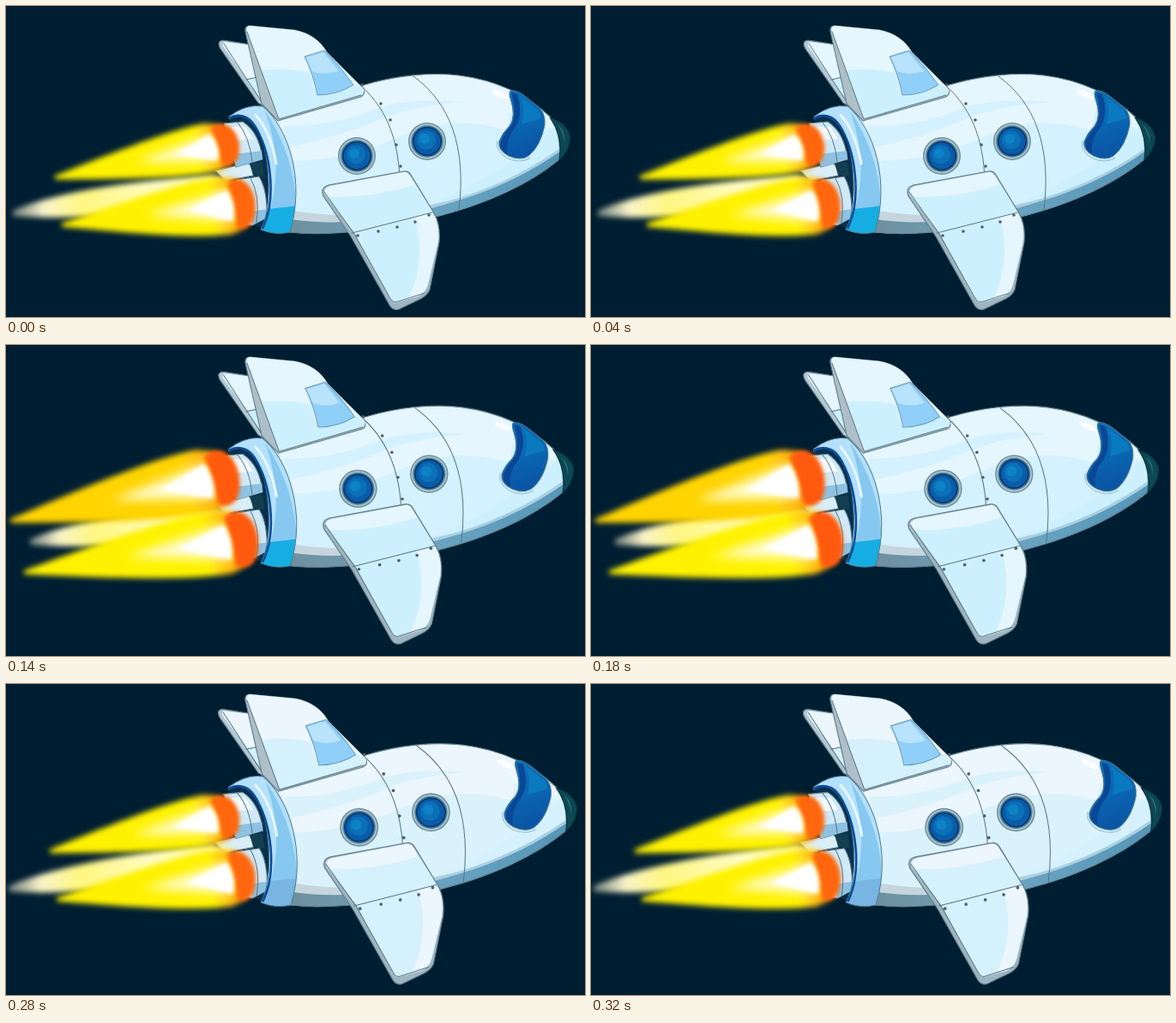
These frames come from a looping animation (675x363 px, 0.35 s). An HTML page:

```html
<!DOCTYPE html>
<html lang="en">
<head>
<meta charset="utf-8">
<title>Rocket</title>
<style>
html, body { margin: 0; width: 100%; height: 100%; overflow: hidden; background: #001e31; }
svg { display: block; width: 675px; height: 363px; }
.ln { fill: none; stroke: #567786; stroke-width: 1; stroke-linecap: round; }
.ol { stroke: #5f7e8b; stroke-width: 1.1; stroke-linejoin: round; }
.skin { fill: var(--skin); }
.tint { fill: var(--tint); }
</style>
</head>
<body>
<svg id="stage" viewBox="0 0 675 363">
  <defs>
    <filter id="soft" x="-20%" y="-40%" width="140%" height="180%"><feGaussianBlur stdDeviation="3"/></filter>
    <filter id="edge" x="-40%" y="-40%" width="180%" height="180%"><feGaussianBlur stdDeviation="2"/></filter>
    <filter id="glow" x="-30%" y="-60%" width="160%" height="220%"><feGaussianBlur stdDeviation="6"/></filter>
    <linearGradient id="pale">
      <stop offset="0" stop-color="#c9cbb8" stop-opacity=".6"/>
      <stop offset=".14" stop-color="#f8f3c8"/>
      <stop offset=".32" stop-color="#fff780"/>
      <stop offset=".65" stop-color="#fffbc4"/>
      <stop offset="1" stop-color="#fff98c"/>
    </linearGradient>
    <linearGradient id="bellyFill" x1="0" x2="1">
      <stop offset="0" stop-color="#6f909d"/>
      <stop offset=".5" stop-color="#6ba4c2"/>
      <stop offset="1" stop-color="#5596b8"/>
    </linearGradient>
    <linearGradient id="pane" x1="0" y1="0" x2=".2" y2="1">
      <stop offset="0" stop-color="#0a70b8"/>
      <stop offset=".5" stop-color="#0a68b4"/>
      <stop offset="1" stop-color="#0a55a4"/>
    </linearGradient>
    <clipPath id="hullClip"><path d="M298 117C340 120 385 102 418 92C455 81 495 77 528 81C575 87 610 106 635 130Q648 150 645 179C610 208 560 231 505 245C455 259 380 270 330 264C344 215 330 150 298 117Z"/></clipPath>
    <clipPath id="ringClip"><path id="ringPath" d="M260 129Q280 114 299 117C330 142 349 205 331 264Q314 268 297 261C316 225 304 128 275 128Q266 128 260 132Z"/></clipPath>
    <clipPath id="wingClip"><path d="M378 210L463 194Q468 193 471 198L497 240Q506 254 504 275L492 325Q489 336 480 339L456 346Q451 347 448 342L406 264L372 220Q369 213 378 210Z"/></clipPath>
    <clipPath id="finClip"><path d="M284 23L336 28Q362 33 374 54L416 96Q419 101 414 104L318 132L281 31Q279 24 284 23Z"/></clipPath>
  </defs>
  <rect width="675" height="363" fill="#001e31"/>

  <g id="ship">
    <!-- far fin -->
    <path class="ol" fill="#b4c9d3" d="M253 40L285 45L302 118L294 113L250 50Q245 41 253 40Z"/>
    <path class="skin" d="M256 42L284 45.500L293 84L281 85L253 47Q252 42 256 42Z"/>
    <path class="tint" d="M281 86L293 84L300 112Z"/>
    <path class="ln" d="M280 86L293 83M254 44L298 112"/>

    <!-- engine bay -->
    <path fill="#08304c" d="M260 131Q276 124 288 140C309 170 314 225 298 260L284 252L276 190Z"/>
    <path class="ol" fill="#d9eef7" d="M244 192L282 183Q289 188 288 198L256 204Z"/>
    <path fill="#123f50" d="M284 184L299 182L301 199L288 197Z"/>
    <path class="ol" fill="#cfe9f6" d="M254 137L276 135C290 144 297 160 299 179L268 188Z"/>
    <path fill="#8ec2e2" d="M266 173L298 169L299 179L268 188Z"/>
    <path fill="#f1faff" d="M262 141L279 141L288 155L266 157Z"/>
    <path class="ln" d="M270 136Q284 152 287 182"/>
    <path class="ol" fill="#cfe9f6" d="M268 203L295 199Q305 215 304 247L287 256L276 255Z"/>
    <path fill="#8ec2e2" d="M285 240L304 237L304 247L287 256Z"/>
    <path class="ln" d="M285 201Q297 222 292 253"/>

    <!-- hull -->
    <g clip-path="url(#hullClip)">
      <rect class="skin" x="290" y="70" width="370" height="205"/>
      <path class="tint" d="M323 140Q380 142 440 117Q540 94 650 150V215L330 250Q338 190 323 140Z" opacity=".72"/>
      <path class="skin" d="M325 166Q390 153 450 127Q510 108 589 112L584 145Q520 126 462 151Q400 180 334 181Z"/>
      <path class="tint" d="M462 240Q560 215 640 140L650 190L510 255Z"/>
      <path fill="#c6d5dd" d="M334 239Q390 248 450 242L512 228L500 255L330 272Z"/>
      <path fill="#a9cfe0" d="M490 234Q580 214 650 163V200L490 255Z"/>
      <path fill="url(#bellyFill)" d="M332 249C400 259 470 246 540 223Q600 203 650 167V200L510 260L330 275Z"/>
    </g>
    <path class="ol" fill="none" d="M298 117C340 120 385 102 418 92C455 81 495 77 528 81C575 87 610 106 635 130Q648 150 645 179C610 208 560 231 505 245C455 259 380 270 330 264"/>
    <ellipse cx="576" cy="103" rx="11" ry="3.500" transform="rotate(24 576 103)" fill="#fff" opacity=".8"/>
    <path class="ln" d="M410 90C442 116 458 154 459 205M475 82C518 113 537 165 528 238"/>
    <g class="rivets" data-at="415,92 437,114 448,133 455,162 460,187"></g>

    <!-- nose -->
    <path fill="#0b4853" stroke="#06313d" d="M634 130Q655 137 658 153Q657 169 645 180Q650 153 634 130Z"/>
    <path fill="#2f6a75" d="M643 138Q653 146 651 161Q650 148 643 138Z"/>

    <!-- cockpit -->
    <path fill="url(#pane)" stroke="#48768f" d="M588 99Q595 97 606 106L622 119Q629 126 628 139Q623 164 609 175Q600 181 586 175Q573 168 575 158Q578 149 587 140Q595 129 588 108Q586 101 588 99Z"/>
    <path fill="#0a4795" d="M589 101L596 103Q604 126 593 143Q583 154 584 173Q575 167 577 159Q580 150 588 141Q597 128 589 101Z"/>
    <path fill="#0a86c8" d="M600 106L620 121Q624 126 624 131L601 138Q606 121 600 106Z" opacity=".6"/>
    <path fill="none" stroke="#a8cddd" stroke-width="1.5" d="M573 157Q570 169 585 178Q600 184 611 177"/>

    <!-- ring -->
    <g clip-path="url(#ringClip)">
      <rect x="255" y="110" width="90" height="160" fill="#b3e0fb"/>
      <path fill="#86c8f0" d="M302 122Q340 180 338 245L304 248Q326 190 302 122Z"/>
      <path id="ringLow" d="M306 237L340 233V270H290Z"/>
      <path fill="none" stroke="#e8f7ff" stroke-width="3" stroke-linecap="round" d="M291 127Q309 148 315 184"/>
    </g>
    <use href="#ringPath" fill="none" stroke="#4d7a94"/>
    <path fill="none" stroke="#0a4b98" stroke-width="2.500" d="M260 131Q276 122 289 139C309 168 316 225 299 260"/>

    <g id="ports"></g>

    <!-- near fin -->
    <path class="ol" fill="#aebfc8" d="M284 23Q278 23 279 30L298 114L317 134L414 106Q420 103 416 96L374 54Q362 33 336 28Z"/>
    <g clip-path="url(#finClip)">
      <rect class="skin" x="275" y="18" width="150" height="120"/>
      <path class="tint" d="M290 76Q328 71 354 78L362 104L408 91L425 105L318 138Z"/>
    </g>
    <path class="ln" d="M281 30L318 132L414 104"/>
    <path fill="#8fcff8" stroke="#6e9dbb" d="M348 59L371 52Q390 70 405 92Q386 104 363 104Q358 79 348 59Z"/>
    <path fill="#b9e3fd" d="M350 60L370 54L388 76Q370 82 357 76Z"/>

    <!-- wing -->
    <path class="ol" fill="#9fb5c0" d="M376 209L463 193Q469 192 472 197L498 240Q507 254 505 276L494 331Q491 338 483 342L458 354Q451 356 447 349L402 269L370 222Q366 212 376 209Z"/>
    <g clip-path="url(#wingClip)">
      <rect class="skin" x="365" y="190" width="145" height="165"/>
      <path class="tint" d="M371 222Q420 226 478 208L498 240L404 264Z"/>
      <path class="tint" d="M404 264L476 246Q492 298 466 348L452 350Z"/>
    </g>
    <path class="ln" d="M371 217L406 266L449 343Q452 347 457 345L488 335M403 265L497 241"/>
    <g class="rivets" data-at="410,268 434,263 456,258 477,252 493,244"></g>
  </g>
  <g id="fire"></g>
</svg>
<script>
const NS = "http://www.w3.org/2000/svg";
const STEP = 70;
const $ = id => document.getElementById(id);

function add(parent, tag, attrs) {
  const el = document.createElementNS(NS, tag);
  for (const k in attrs) el.setAttribute(k, attrs[k]);
  parent.appendChild(el);
  return el;
}

document.querySelectorAll(".rivets").forEach(g => {
  for (const p of g.dataset.at.split(" ")) {
    const [cx, cy] = p.split(",");
    add(g, "circle", { cx, cy, r: 1.8, fill: "#4d6069" });
  }
});

function port(cx, cy) {
  const disc = (r, fill, dx = 0, dy = 0) => add($("ports"), "circle", { cx: cx + dx, cy: cy + dy, r, fill });
  disc(22, "#6f929f");
  disc(20.5, "#a9c6d1");
  disc(18.8, "#5b7f90");
  disc(17.3, "#073f7a");
  disc(15.3, "#0a5ca8");
  disc(11, "#0b70b8", -1, -1.5);
  disc(6, "#0d82c6", -3, -3);
}
port(409, 175);
port(491, 158);

// Ship height and scale, flame ends [tailX, tailY, headX, headY, halfWidth], tail colours.
const YELLOW = "#fff205", AMBER = "#ffd406";
const poses = [
  { y: 23, s: 1, up: [54, 201, 270, 159, 29], low: [62, 256, 289, 229, 34], mid: [8, 242], hue: [YELLOW, YELLOW] },
  { y: 17, s: .999, up: [56, 194, 271, 152, 30], low: [64, 251, 290, 221, 34], mid: [-4, 242], hue: [YELLOW, YELLOW] },
  { y: 14, s: 1.011, up: [2, 206, 270, 151, 38], low: [18, 266, 292, 224, 38], mid: [28, 230], hue: [AMBER, YELLOW], hot: true },
  { y: 18, s: 1.018, up: [0, 200, 268, 153, 36], low: [16, 268, 288, 230, 39], mid: [27, 234], hue: [YELLOW, AMBER], hot: true },
  { y: 12, s: 1.021, up: [48, 196, 270, 152, 30], low: [56, 252, 289, 222, 34], mid: [3, 239], hue: [YELLOW, YELLOW], cool: true }
];

const plume = (L, w, from) =>
  `M${from} -2C${L * .4} ${-w * .64} ${L * .68} ${-w} ${L * .84} ${-w}` +
  `Q${L} ${-w * .8} ${L} 0Q${L} ${w * .8} ${L * .87} ${w}` +
  `C${L * .68} ${w} ${L * .4} ${w * .62} ${from} 2Z`;

function makeFlame(id) {
  const g = add($("fire"), "g", {});
  const ramp = add(g, "linearGradient", { id });
  const stop = (offset, color) => add(ramp, "stop", { offset, "stop-color": color });
  const tail = [stop(.1), stop(.78)];
  stop(.91, "#ffa310");
  stop(1, "#ff5a06");
  return {
    g, tail,
    body: add(g, "path", { filter: "url(#soft)", fill: `url(#${id})` }),
    core: add(g, "path", { filter: "url(#glow)", fill: "#fffbc4" }),
    cap: add(g, "path", { filter: "url(#edge)" }),
    heart: add(g, "path", { filter: "url(#edge)", fill: "#fff" })
  };
}

function setFlame(f, [tx, ty, hx, hy, w], hot, hue) {
  const L = Math.hypot(hx - tx, hy - ty);
  const turn = Math.atan2(hy - ty, hx - tx) * 180 / Math.PI;
  const rim = L - (hot ? 31 : 25);
  f.g.setAttribute("transform", `translate(${tx} ${ty}) rotate(${turn})`);
  f.tail.forEach(s => s.setAttribute("stop-color", hue));
  f.body.setAttribute("d", plume(L, w, 3));
  f.core.setAttribute("d", `M${L * .45} 0L${rim - 5} ${-w * .55}V${w * .58}Z`);
  f.heart.setAttribute("d", `M${L * .66} 0L${rim - 5} ${-w * .52}Q${rim + 5} 0 ${rim - 2} ${w * .58}Z`);
  f.cap.setAttribute("d",
    `M${rim - 3} ${-w * .74}Q${L - 13} ${-w * 1.05} ${L - 3} ${-w * .5}` +
    `Q${L + 3} 0 ${L - 3} ${w * .55}Q${L - 10} ${w} ${rim + 2} ${w * .78}` +
    `Q${rim + 4} 0 ${rim - 3} ${-w * .74}Z`);
  f.cap.setAttribute("fill", hot ? "#ff5a08" : "#ff6609");
}

const mid = add($("fire"), "path", { filter: "url(#soft)", fill: "url(#pale)" });
const up = makeFlame("upRamp");
const low = makeFlame("lowRamp");

function draw(t) {
  const p = poses[Math.floor(t / STEP) % poses.length];
  const ship = $("ship");
  ship.setAttribute("transform", `translate(281 ${p.y}) scale(${p.s}) translate(-281 -23)`);
  ship.style.setProperty("--skin", p.cool ? "#ecf6ff" : "#e6f6ff");
  ship.style.setProperty("--tint", p.cool ? "#d5f1fb" : "#cdf0ff");
  $("ringLow").setAttribute("fill", p.cool ? "#79b5e2" : "#16aee2");

  const [mx, my] = p.mid;
  const dy = p.y - 23;
  mid.setAttribute("d",
    `M${mx} ${my - 3}Q${mx + 65} ${my - 32} 240 ${197 + dy}L265 ${204 + dy}` +
    `L235 ${232 + dy}Q${mx + 90} ${my + 10} ${mx} ${my + 3}Z`);
  setFlame(up, p.up, p.hot, p.hue[0]);
  setFlame(low, p.low, p.hot, p.hue[1]);
}

function tick(now) {
  draw(now % (STEP * poses.length));
  requestAnimationFrame(tick);
}
draw(0);
requestAnimationFrame(tick);
</script>
</body>
</html>
```
